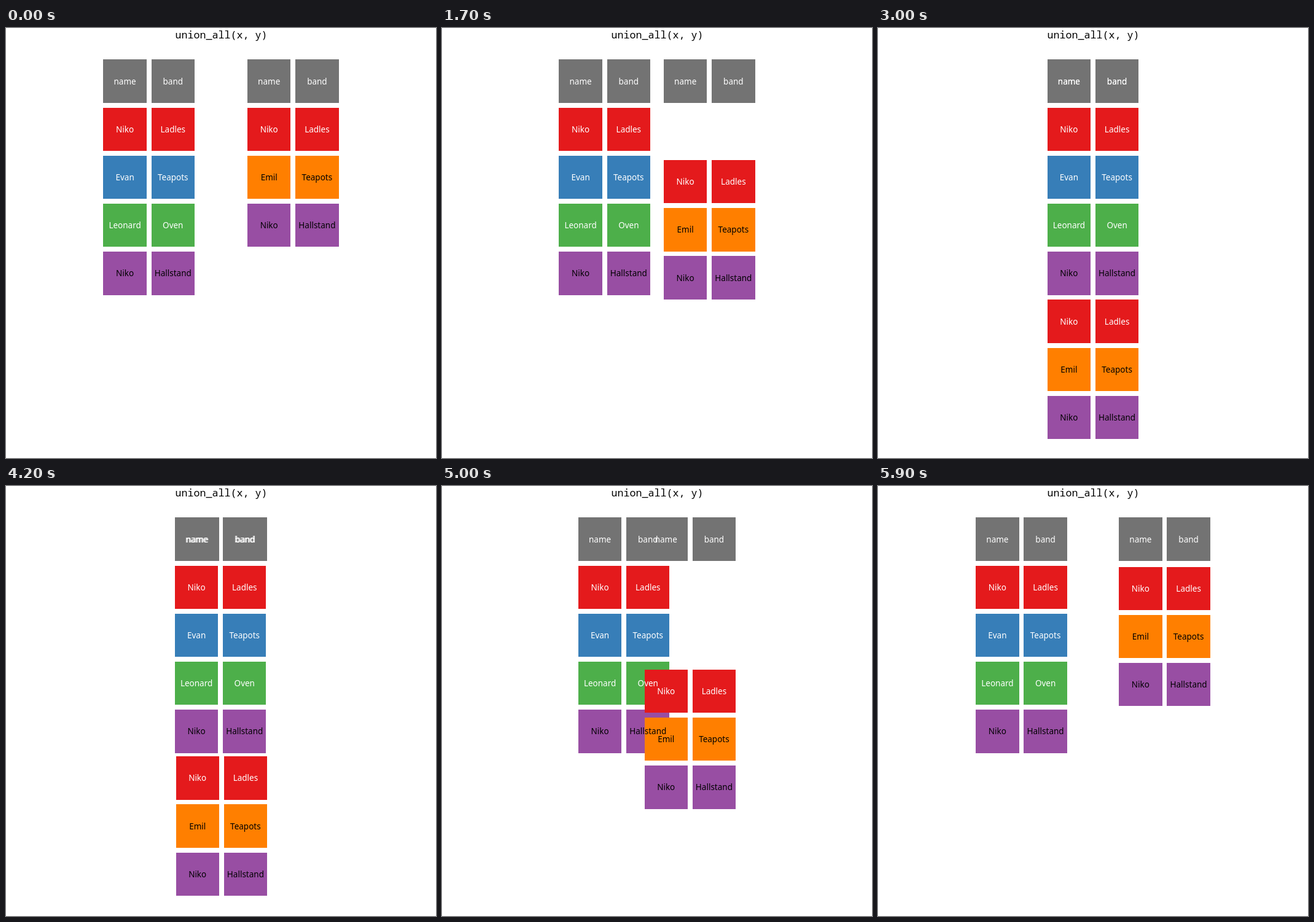
Animation, 700 px wide and 700 px high, one loop 6000 ms. Source, as an HTML page:

```html
<!DOCTYPE html>
<html lang="en">
<head>
<meta charset="utf-8">
<title>union_all</title>
<style>
  html, body { margin: 0; width: 100%; height: 100%; overflow: hidden; background: #fff; }
  svg { display: block; width: 100%; height: 100%; }
  text { text-anchor: middle; font: 13.5px "Noto Sans", sans-serif; }
  .title { font: 16.67px "Noto Sans Mono", monospace; }
</style>
</head>
<body>
<svg viewBox="0 0 700 700">
  <text class="title" x="350.5" y="17">union_all(x, y)</text>
  <g id="tiles"></g>
  <g id="labels"></g>
</svg>
<script>
// The two tables span 4.9 grid units, centred on the stage.
const PITCH = 78.2, SIZE = PITCH * 0.9, LEFT = 350 - PITCH * 2.45, TOP = 51.33;
const LOOP = 6000, STEP = 100;
const GREY = ['#737373', '#fff'], RED = ['#e41a1c', '#fff'], BLUE = ['#377eb8', '#fff'],
      GREEN = ['#4daf4a', '#fff'], PURPLE = ['#984ea3', '#000'], ORANGE = ['#ff7f00', '#000'];

const tableX = [
  [GREY, 'name', 'band'],
  [RED, 'Niko', 'Ladles'],
  [BLUE, 'Evan', 'Teapots'],
  [GREEN, 'Leonard', 'Oven'],
  [PURPLE, 'Niko', 'Hallstand']
];
const tableY = [
  [GREY, 'name', 'band'],
  [RED, 'Niko', 'Ladles'],
  [ORANGE, 'Emil', 'Teapots'],
  [PURPLE, 'Niko', 'Hallstand']
];

function add(parentId, tag, fill) {
  const node = document.createElementNS('http://www.w3.org/2000/svg', tag);
  node.setAttribute('fill', fill);
  return document.getElementById(parentId).appendChild(node);
}

function setAll(node, attributes) {
  for (const key in attributes) node.setAttribute(key, attributes[key]);
}

// Columns and rows are in grid units; dx and dy are the full travel.
function buildCells(table, firstColumn, dx, dy) {
  return table.flatMap(([[fill, ink], ...words], row) => words.map((word, i) => {
    const tile = add('tiles', 'rect', fill);
    const label = add('labels', 'text', ink);
    label.textContent = word;
    return { tile, label, column: firstColumn + i, row, dx, dy: row ? dy : 0 };
  }));
}

const cells = [...buildCells(tableX, 0, 1.5, 0), ...buildCells(tableY, 3, -1.5, 4)];

const ease = t => (1 - Math.cos(Math.PI * t)) / 2;
const clamp = t => Math.min(1, Math.max(0, t));

function progress(time) {
  const step = Math.floor(time / STEP);
  return ease(clamp((step - 10) / 20)) - ease(clamp((step - 41) / 19));
}

function draw(now) {
  const p = progress(now % LOOP);
  for (const { tile, label, column, row, dx, dy } of cells) {
    const left = LEFT + (column + dx * p) * PITCH;
    const top = TOP + (row + dy * p) * PITCH;
    const x = Math.round(left), y = Math.round(top);
    setAll(tile, { x, y, width: Math.round(left + SIZE) - x, height: Math.round(top + SIZE) - y });
    setAll(label, { x: left + SIZE / 2, y: top + SIZE / 2 + 5 });
  }
}

const start = performance.now();
function tick() {
  draw(performance.now() - start);
  requestAnimationFrame(tick);
}
tick();
</script>
</body>
</html>
```
